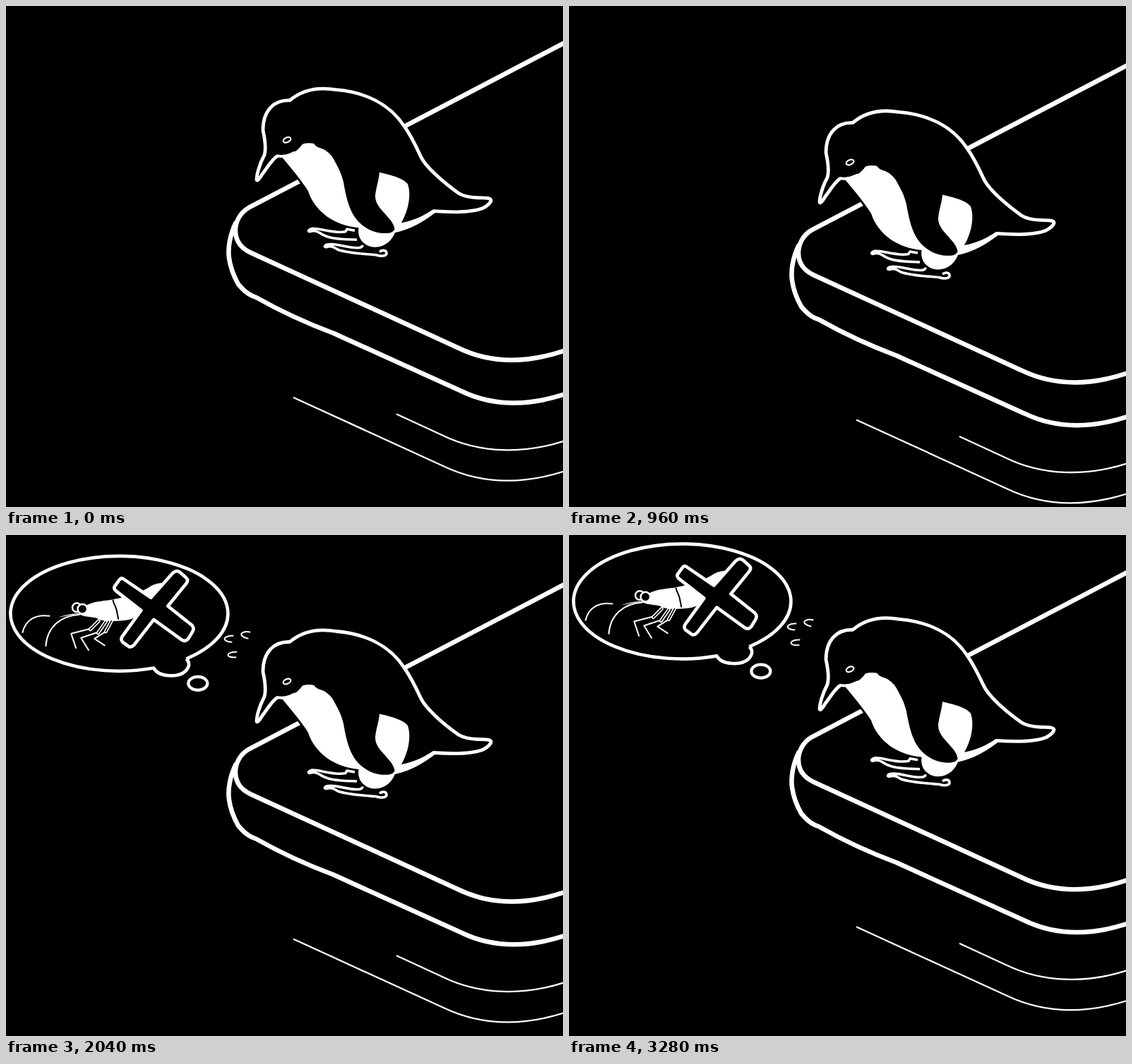
Animation, 789 px wide and 710 px high, one loop 3320 ms. Source, as an HTML page:

```html
<!DOCTYPE html>
<html lang="en">
<head>
<meta charset="utf-8">
<title>Penguin on an ice floe</title>
<style>
  html, body { margin: 0; width: 100%; height: 100%; overflow: hidden; background: #000; }
  svg { display: block; width: 789px; height: 710px; }
  path, ellipse, circle { stroke-linejoin: round; }
  .line { fill: none; stroke: #fff; }
  .solid { fill: #000; stroke: #fff; }
  .white { fill: #fff; }
</style>
</head>
<body>
<svg viewBox="0 0 789 710">
  <g id="scene">
    <!-- ice floe and ripples -->
    <g class="line" stroke-width="6.5">
      <path d="M326 306C317 324 314 343 316 357C318 372 324 385 329 394L334 399.500C340 406 346 410 354 412.500C385 430 425 449 464 463.500L645 545.500C690 567.400 740 568.400 800 547"/>
      <path d="M800 47.250L344 285.500C331 293 325 306 325 318C325 333 333 343 347 349.500L640 484C688 507.600 742 506.600 800 485"/>
    </g>
    <g class="line" stroke-width="2.300">
      <path d="M407 554.500L620 652C675 678.300 735 678.800 800 656"/>
      <path d="M553 578L618 608C670 633.600 735 636.600 800 613"/>
    </g>

    <g id="penguin">
      <path fill="#000" stroke="#000" stroke-width="8" d="M394 214C410 234 421 248 428 262C436 288 464 308 500 314L560 312L560 220L440 195Z"/>
      <path class="solid" stroke-width="4.800" d="M605 290.500C640 293 664 291 676 286C682 283 687 278 687 275C686 271 678 272 668 271.500C658 271 649 270 641 265C620 250 594 228 587 212C581 199 574 184 564 170C543 138 508 122 468 118.500C442 114 419 119 402 133.500C379 133 364 148 364 176C366 185 369 201 366 211C358 226 355 240 355 246C356 249 360 243 363 238C370 229 376 218 384 212.500"/>
      <path class="line" stroke-width="4" d="M383 212C397 215 411 209 420 196"/>
      <path fill="#000" d="M386 210C400 211 410 204 418 194L440 192L604 288L560 309L500 300L440 200Z"/>
      <path class="white" d="M391 214C404 212 413 205 420 195.500Q428 193 437 195L458 205L510 304L500 314C464 311 437 290 428 262C420 249 406 232 391 214Z"/>
      <path class="white" d="M500 312C496 329 507 341 523 341.500C538 341 548 331 552 318L525 300Z"/>
      <path d="M436 194C439 201 446 200 452 204C466 213 473 231 478 249C483 279 489 296 502 308C514 319 530 324 545 321C552 319 552 311 546 303L560 240L480 180Z"/>
      <path class="white" d="M529 235.500C545 239 563 244 569 252C574 266 571 288 560 307C577 304 592 297 605 288L608 292.800C592 305 572 317 551 321C551 312 547 305 540 298C534 290 523 282 523 269C524 257 528 248 529 235.500Z"/>
      <ellipse class="line" stroke-width="2.300" cx="398" cy="189.500" rx="5.600" ry="3.300" transform="rotate(-25 398 189.500)"/>
      <g class="line" stroke-width="3.600">
        <path d="M494 318L483 316L481 319.500C466 323 446 315 434 315C429 316 427 319 430 319.500C434 318 439 318 444 321C456 330 473 330 497 331"/>
        <path d="M505 338.500Q505 342 499 342.500C484 343 467 336 457 337.500C451 338 450 342 454 341.500C461 339 465 342 470 345C484 350 506 351 524 352.500C531 355 540 354.500 539 349.500C538 345 533 345.500 529 348"/>
      </g>
    </g>

    <g id="thought" transform="translate(0.3 -18.200)" visibility="hidden">
      <path class="line" stroke-width="4.600" d="M255 175.700A154 81.500 0 1 0 209 188.800C216 202 245 203 255 192C260 186 260 180 255 175.700"/>
      <ellipse class="line" stroke-width="4.200" cx="271.500" cy="210.500" rx="13.500" ry="9.500"/>
      <g class="line" stroke-width="2">
        <path d="M322 143C314 142 307 146 310 149Q313 152 320 152"/>
        <path d="M346 138C338 136 330 139 334 143Q337 146 343 147"/>
        <path d="M327 166C317 165 311 170 316 172.500Q320 174 326 173.500"/>
      </g>
      <!-- shrimp -->
      <path class="white" d="M111 101C125 93 142 94 154 91C174 87 191 82 206 72Q214 68 224 68L215 95L192 108C185 119 171 122 158 122C144 123 134 122 128 118C119 116 108 116 102 112L73 117Q88 112 104 111Z"/>
      <path d="M151 92C153 101 156 101 157 110L159 120" fill="none" stroke="#000" stroke-width="2"/>
      <circle class="solid" stroke-width="2.500" cx="100" cy="103" r="6.300"/>
      <circle class="solid" stroke-width="2.500" cx="108" cy="105" r="6.800"/>
      <g class="line" stroke-width="2">
        <path d="M62 115C42 112 27 120 23 139"/>
        <path d="M104 113C77 115 58 130 56 158"/>
        <path d="M119 133L92 140L99 161"/>
        <path d="M130 138L106 146L117 164"/>
        <path d="M141 137L125 147L140 157"/>
      </g>
      <g id="thighs" fill="none" stroke-linecap="round"></g>
      <path class="solid" stroke-width="4.600" d="M167 63L205 89L236 54Q241 49 246 53L254 60Q259 64 255 69L229 101L263 128Q267 132 264 137L258 147Q254 152 249 149L209 120L181 156Q176 161 172 157L165 152Q161 148 165 143L191 107L155 79Q151 75 155 71L160 64Q163 60 167 63Z"/>
    </g>
  </g>
</svg>
<script>
  const LOOP = 3320, STEP = 40, DROP = 37;
  const THOUGHT_AT = 1360;
  // turning points of the bobbing: [ms, 0 = highest, 1 = lowest]
  const bob = [[-40, 0], [755, 1], [1605, 0], [2490, 1], [3360, 0]];
  const squash = [[0, 0], [1080, 0], [1200, 1], [1360, 0], [LOOP, 0]];

  const $ = id => document.getElementById(id);
  const scene = $('scene'), penguin = $('penguin'), thought = $('thought');

  const thighs = 'M131 122L119 134M141 123L130 139M149 122L141 137';
  $('thighs').innerHTML = [['#fff', 5], ['#000', 1.6]]
    .map(([color, width]) => `<path d="${thighs}" stroke="${color}" stroke-width="${width}"/>`).join('');

  function sample(table, t) {
    const i = table.findIndex(key => key[0] > t);
    const [t0, a] = table[i - 1], [t1, b] = table[i];
    const ease = (1 - Math.cos(Math.PI * (t - t0) / (t1 - t0))) / 2;
    return a + (b - a) * ease;
  }

  function draw(now) {
    const t = Math.floor((now % LOOP) / STEP) * STEP;
    const s = sample(squash, t);
    scene.setAttribute('transform', `translate(0 ${(DROP * sample(bob, t)).toFixed(2)})`);
    penguin.setAttribute('transform',
      `translate(503 351) scale(${1 + 0.027 * s} ${1 - 0.0235 * s}) translate(-503 -351)`);
    thought.setAttribute('visibility', t >= THOUGHT_AT ? 'visible' : 'hidden');
  }

  const start = performance.now();
  function tick() {
    draw(performance.now() - start);
    requestAnimationFrame(tick);
  }
  tick();
</script>
</body>
</html>
```
